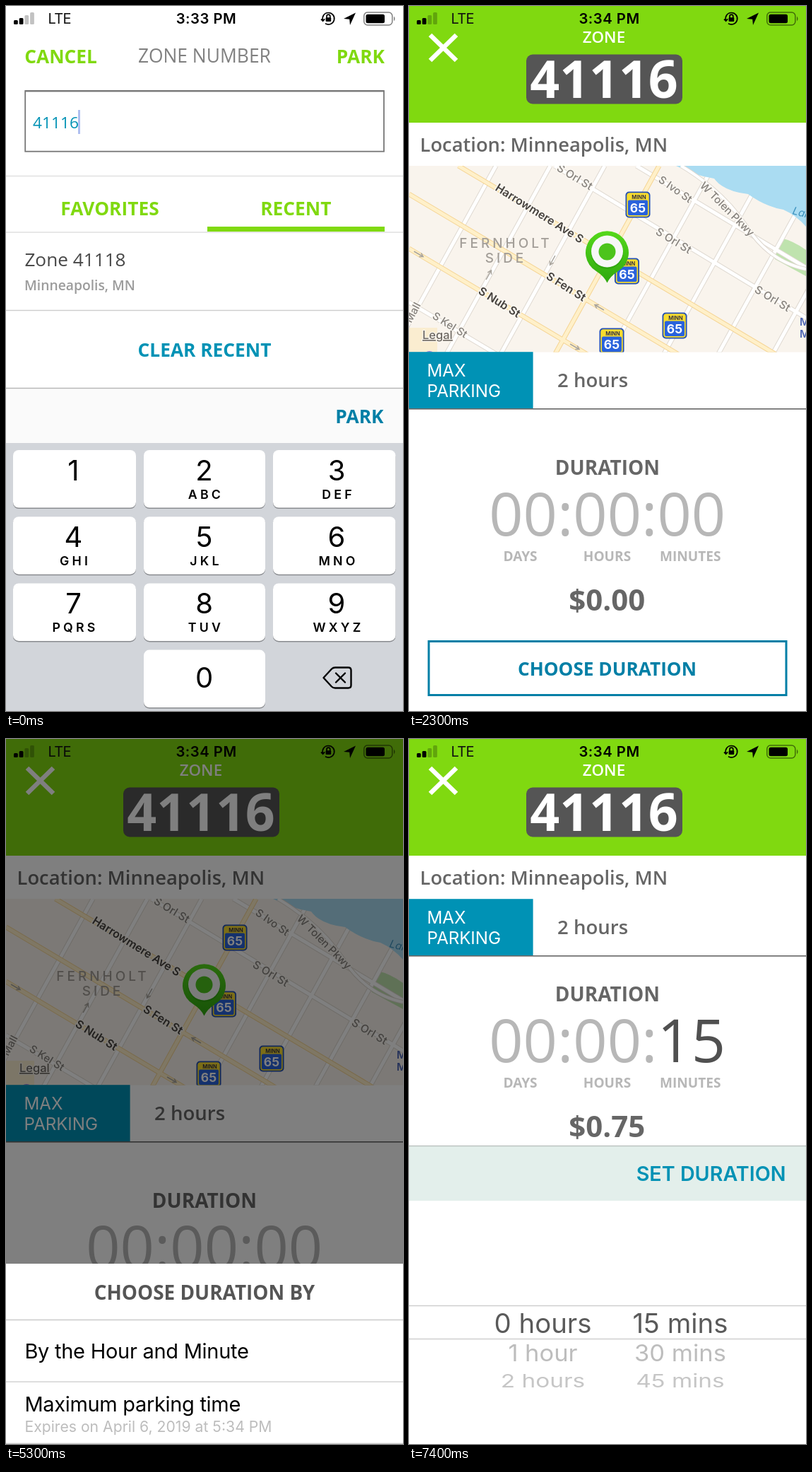
An HTML page for the animation above (8 s loop, 562x997 px).

```html
<!DOCTYPE html>
<html lang="en">
<head>
<meta charset="utf-8">
<title>Parking session</title>
<style>
  html, body { margin: 0; width: 100%; height: 100%; overflow: hidden; background: #fff; }
  svg { display: block; width: 100%; height: 100%; }
  text { font-family: "Open Sans", sans-serif; white-space: pre; }
  .ui { font-family: Inter, sans-serif; }
</style>
</head>
<body>
<svg id="stage" viewBox="0 0 562 997" preserveAspectRatio="none"></svg>
<script>
const LOOP = 8000;
const STARTS = [0, 500, 3500, 6500];
const GREEN = '#80d910', TEAL = '#0092b5', DEEP = '#007fa6', GREY = '#666', PALE = '#b7b7b7';

const rect = (x, y, w, h, fill, extra = '') =>
  `<rect x="${x}" y="${y}" width="${w}" height="${h}" fill="${fill}" ${extra}/>`;
const line = (y, color, w = 1.4) => rect(0, y - w / 2, 562, w, color);
const path = (d, color, w, extra = '') =>
  `<path d="${d}" fill="none" stroke="${color}" stroke-width="${w}" ${extra}/>`;
const group = (body, transform) => `<g transform="${transform}">${body}</g>`;

function text(str, x, y, size, fill, { w = 400, a = 'start', ls = 0, ui = false, extra = '' } = {}) {
  return `<text x="${x}" y="${y}" font-size="${size}" fill="${fill}" font-weight="${w}" text-anchor="${a}"
    letter-spacing="${ls}" ${ui ? 'class="ui"' : ''} ${extra}>${str}</text>`;
}
const bold = (str, x, y, size, fill, a = 'middle') => text(str, x, y, size, fill, { w: 700, a });
const ui = (str, x, y, size, fill, opt = {}) => text(str, x, y, size, fill, { ...opt, ui: true });

function statusBar(time) {
  const bars = [6, 9, 13, 17].map((h, i) =>
    rect(11 + i * 7.7, 26 - h, 5.8, h, '#000', `rx="1.5" opacity="${i < 2 ? 1 : 0.24}"`)).join('');
  return bars
    + ui('LTE', 59.5, 25, 20, '#111', { ls: -0.6 })
    + ui(time, 283.5, 25, 20.3, '#000', { w: 600, a: 'middle', ls: 0.5 })
    + path('M448.6 20.5A8.3 8.3 0 1 1 452 24.8M446 18.6l2.6 2.6 2.6-2.8M454 17v-2.4a2.4 2.4 0 0 1 4.8 0V17', '#000', 1.7)
    + rect(452.6, 16.3, 7.6, 5.6, '#000', 'rx="1"')
    + '<path d="M495 9.5L478 18l8.2.8.8 8.2z"/>'
    + rect(506.8, 9, 40, 18, 'none', 'rx="5" stroke="#000" stroke-width="1.5" opacity=".5"')
    + rect(509.5, 11.7, 26.5, 12.6, '#000', 'rx="2.5"')
    + '<path d="M549 14.5q3 3.5 0 7z" opacity=".55"/>';
}

function keypad() {
  const letters = ['', 'ABC', 'DEF', 'GHI', 'JKL', 'MNO', 'PQRS', 'TUV', 'WXYZ'];
  const columns = [[10, 174], [195, 172], [378, 173.5]];
  const key = (col, row, digit, sub) => {
    const [x, w] = columns[col], y = 628 + row * 94.2, mid = [95.5, 280.5, 468][col];
    return rect(x, y + 1.5, w, 81.5, '#898b8f', 'rx="8"') + rect(x, y, w, 81.5, '#fff', 'rx="8"')
      + ui(digit, mid, y + (digit ? 43 : 53), 40, '#000', { a: 'middle' })
      + ui(sub, mid + 2.5, y + 69, 17.8, '#000', { w: 600, a: 'middle', ls: 4.2 });
  };
  return rect(0, 618, 562, 379, '#d2d5da')
    + letters.map((s, i) => key(i % 3, Math.floor(i / 3), i + 1, s)).join('')
    + key(1, 3, 0, '')
    + path('M449.5 950L461 937.5Q463 935.5 466 935.5H484.5Q488.5 935.5 488.5 939.5V960.5Q488.5 964.5 484.5 964.5H466Q463 964.5 461 962.5ZM467 943.5l13 13M480 943.5l-13 13', '#000', 2.4, 'stroke-linejoin="round" stroke-linecap="round"');
}

function zoneEntry() {
  return rect(0, 0, 562, 997, '#fff') + statusBar('3:33 PM')
    + bold('CANCEL', 26.3, 81, 26.3, GREEN, 'start')
    + text('ZONE NUMBER', 281, 80, 26.4, '#808080', { a: 'middle' })
    + bold('PARK', 536, 81, 26.3, GREEN, 'end')
    + rect(27.2, 120, 507.8, 85.7, '#fff', 'stroke="#777" stroke-width="1.8"')
    + rect(27, 119, 508, 2.4, '#777')
    + rect(102, 147, 3, 34, '#afbff0')
    + text('41116', 38, 173, 22.7, TEAL)
    + line(240.5, '#dedede')
    + bold('FAVORITES', 147, 296, 26.3, GREEN)
    + bold('RECENT', 410.3, 296, 26.3, GREEN)
    + line(320, '#ddd') + rect(285, 312, 251, 7, GREEN)
    + text('Zone 41118', 26.4, 368, 26.2, '#484848')
    + text('Minneapolis, MN', 26, 402, 19.3, '#9c9c9c', { w: 600 })
    + line(430.5, '#ccc')
    + bold('CLEAR RECENT', 281, 495.5, 26.3, TEAL)
    + rect(0, 541, 562, 77, '#fafafa') + line(540.5, '#b5b5b5')
    + bold('PARK', 534.5, 589.5, 26.3, DEEP, 'end')
    + keypad();
}

function shield(x, y) {
  return group(rect(0, 0, 35, 37, '#2450b4', 'rx="5"') + rect(1.8, 1.8, 31.4, 33.4, '#f7dc2e', 'rx="4"')
    + rect(3.5, 12, 28, 21.5, '#2962dc', 'rx="2"')
    + ui('MINN', 19, 10, 7.5, '#224', { w: 600, a: 'middle' })
    + ui('65', 17.5, 29, 17.5, '#fff', { w: 700, a: 'middle' }), `translate(${x} ${y})`);
}

function map() {
  const road = (d, w, edge, fill) => path(d, edge, w + 2) + path(d, fill, w);
  const crossStreet = x => `M${x} 226l-151 273`;
  const crossings = [-3, -2, -1, 1, 2, 3, 4].map(i => crossStreet(354 + i * 77)).join('');
  const plain = crossings + 'M206 226L562 441M322 226L562 370M0 419L135 499';
  const amber = crossStreet(354) + 'M70 226L562 518M0 266L392 499M0 343L263 499';
  const label = (str, x, y, angle, size, fill, w = 500) =>
    group(ui(str, 0, 0, size, fill, { w, extra: 'stroke="#fbf7f1" stroke-width="3" paint-order="stroke"' }),
      `translate(${x} ${y}) rotate(${angle})`);
  const arrow = (x, y, angle) =>
    group(path('M-8 0H7M2-3L7 0L2 3', '#aaa59d', 1.5), `translate(${x} ${y}) rotate(${angle})`);
  const soft = '#85817c', dark = '#45413d';
  return `<clipPath id="view">${rect(0, 226, 562, 263.5, '#000')}</clipPath><g clip-path="url(#view)">`
    + rect(0, 226, 562, 264, '#f9f4ed')
    + rect(0, 455, 40, 40, '#faedd0')
    + '<path d="M526 328Q544 332 562 345V382L518 358Q514 350 526 328Z" fill="#bfe3ae"/>'
    + road(plain, 5, '#dfd9d1', '#fff')
    + road(amber, 5, '#f5d494', '#fff0c9')
    + '<path d="M378 226Q405 240 432 244Q445 262 480 266Q505 284 530 288Q548 296 562 312V226Z" fill="#aadcf2"/>'
    + road('M385 226Q445 262 478 312T562 372', 4, '#dfd9d1', '#fff')
    + arrow(14, 351, 30) + arrow(203, 360, 119) + arrow(113, 380, -61) + arrow(269, 426, 210) + arrow(235, 482, 30)
    + label('S Orl St', 208, 232, 31, 15.5, soft)
    + label('S Orl St', 348, 322, 31, 15.5, soft)
    + label('S Orl St', 488, 404, 31, 15.5, soft)
    + label('S Ivo St', 352, 248, 35, 15, soft)
    + label('W Tolen Pkwy', 411, 255, 45, 15, soft)
    + label('Harrowmere Ave S', 121, 260, 32, 16, dark, 600)
    + label('S Fen St', 193, 385, 32, 16, dark, 600)
    + label('S Nub St', 97, 406, 32, 16, dark, 600)
    + label('S Kel St', 32, 441, 32, 15, soft)
    + label('Mall', 3, 449, -62, 15, soft)
    + group(ui('Lak', 0, 0, 15, '#3c91bd', { extra: 'font-style="italic"' }), 'translate(542 294) rotate(15)')
    + ui('M', 553, 452, 15, '#4f67b5', { w: 600 }) + ui('M', 553, 469, 15, '#4f67b5', { w: 600 })
    + ui('FERNHOLT', 137, 342, 19, '#a39e98', { w: 500, a: 'middle', ls: 4 })
    + ui('SIDE', 137, 363, 19, '#a39e98', { w: 500, a: 'middle', ls: 4 })
    + shield(306.5, 262.5) + shield(291, 356.5) + shield(358.5, 433.5) + shield(269.5, 455.5)
    + '<circle cx="29" cy="497" r="9" fill="#8874dc"/>'
    + ui('Legal', 19, 471, 16.5, '#6d6862', { w: 500, extra: 'text-decoration="underline" stroke="#fbf7f1" stroke-width="2" paint-order="stroke"' })
    + '<linearGradient id="pin" x2="0" y2="1"><stop stop-color="#55d81b"/><stop offset="1" stop-color="#2fa80f"/></linearGradient>'
    + '<path d="M280.5 391.5Q276 382 265 375A30.5 30.5 0 1 1 296 375Q285 382 280.5 391.5Z" fill="url(#pin)"/>'
    + '<circle cx="280.5" cy="349" r="23" fill="#279a0c" opacity=".5"/>'
    + '<circle cx="280.5" cy="347" r="22.5" fill="#f7f7f7"/><circle cx="280.5" cy="347.5" r="12" fill="#4cc41c"/></g>';
}

function header() {
  return rect(0, 0, 562, 997, '#fff') + rect(0, 0, 562, 165, GREEN) + statusBar('3:34 PM')
    + path('M30 41L67 77M67 41L30 77', '#fff', 6.5)
    + text('ZONE', 276, 52, 22.4, '#fff', { w: 600, a: 'middle' })
    + rect(166, 68.5, 221, 70, '#555', 'rx="9"')
    + bold('41116', 276, 130, 73.4, '#fff')
    + text('Location: Minneapolis, MN', 15.6, 206, 27.35, GREY, { w: 600 });
}

const limit = top => group(rect(0, 0, 175.6, 80, TEAL)
  + ui('MAX', 25.6, 35, 24.2, '#fff', { ls: -0.1 }) + ui('PARKING', 25.6, 64, 24.2, '#fff', { ls: -0.1 })
  + text('2 hours', 210, 50, 27.6, GREY, { w: 600 }) + line(80.6, GREY, 1.6), `translate(0 ${top})`);

function duration(baseline, minutes, minuteColor, price) {
  return group(bold('DURATION', 281, 0, 28, GREY)
    + text(`00:00:<tspan fill="${minuteColor}">${minutes}</tspan>`, 280.7, 86, 84.5, PALE, { a: 'middle' })
    + bold('DAYS', 157.5, 122, 19.1, PALE) + bold('HOURS', 280.5, 122, 19.1, PALE) + bold('MINUTES', 398.3, 122, 19.1, PALE)
    + bold(price, 280.3, 192, 42, GREY), `translate(0 ${baseline})`);
}

function session() {
  return header() + map() + limit(489.2) + duration(663.3, '00', PALE, '$0.00')
    + rect(28, 898.5, 506, 76, '#fff', `stroke="${DEEP}" stroke-width="3"`)
    + bold('CHOOSE DURATION', 280.5, 946.7, 26.2, DEEP);
}

function chooser() {
  return session() + rect(0, 0, 562, 742, '#000', 'opacity=".5"') + rect(0, 742, 562, 255, '#fff')
    + bold('CHOOSE DURATION BY', 281, 792.6, 27.9, '#555')
    + line(821.5, '#c8c8c8') + line(909, '#d0d0d0') + line(996.3, '#ccc')
    + ui('By the Hour and Minute', 26.4, 876, 29, '#000', { ls: -0.27 })
    + ui('Maximum parking time', 26.4, 951, 29, '#000', { ls: -0.32 })
    + ui('Expires on April 6, 2019 at 5:34 PM', 26.4, 979.5, 21.2, '#bdbdbd');
}

function picker() {
  // Rows below the selected one are foreshortened like a wheel.
  const row = (hours, mins, y, size, squash, color) => group(
    ui(hours, 189.5, 0, size, color, { a: 'middle' }) + ui(mins, 384, 0, size, color, { a: 'middle' }),
    `translate(0 ${y}) scale(1 ${squash})`);
  return header() + limit(226.2) + duration(371.3, '15', '#505050', '$0.75')
    + rect(0, 575, 562, 78, '#e3efeb') + line(575.5, '#b9c0be')
    + ui('SET DURATION', 533.5, 625, 28.7, TEAL, { w: 600, a: 'end' })
    + line(801.5, '#ccc') + line(848.5, '#ccc')
    + row('0 hours', '15 mins', 840, 38.4, 0.98, '#5a5a5a')
    + row('1 hour', '30 mins', 880, 34.5, 0.94, '#bdbdbd')
    + row('2 hours', '45 mins', 917, 33.4, 0.78, '#c6c6c6');
}

const stage = document.getElementById('stage');
const screens = [zoneEntry(), session(), chooser(), picker()];
let shown = -1;

function tick() {
  const t = performance.now() % LOOP;
  const index = STARTS.filter(s => s <= t).length - 1;
  if (index !== shown) stage.innerHTML = screens[shown = index];
  requestAnimationFrame(tick);
}
tick();
</script>
</body>
</html>
```
